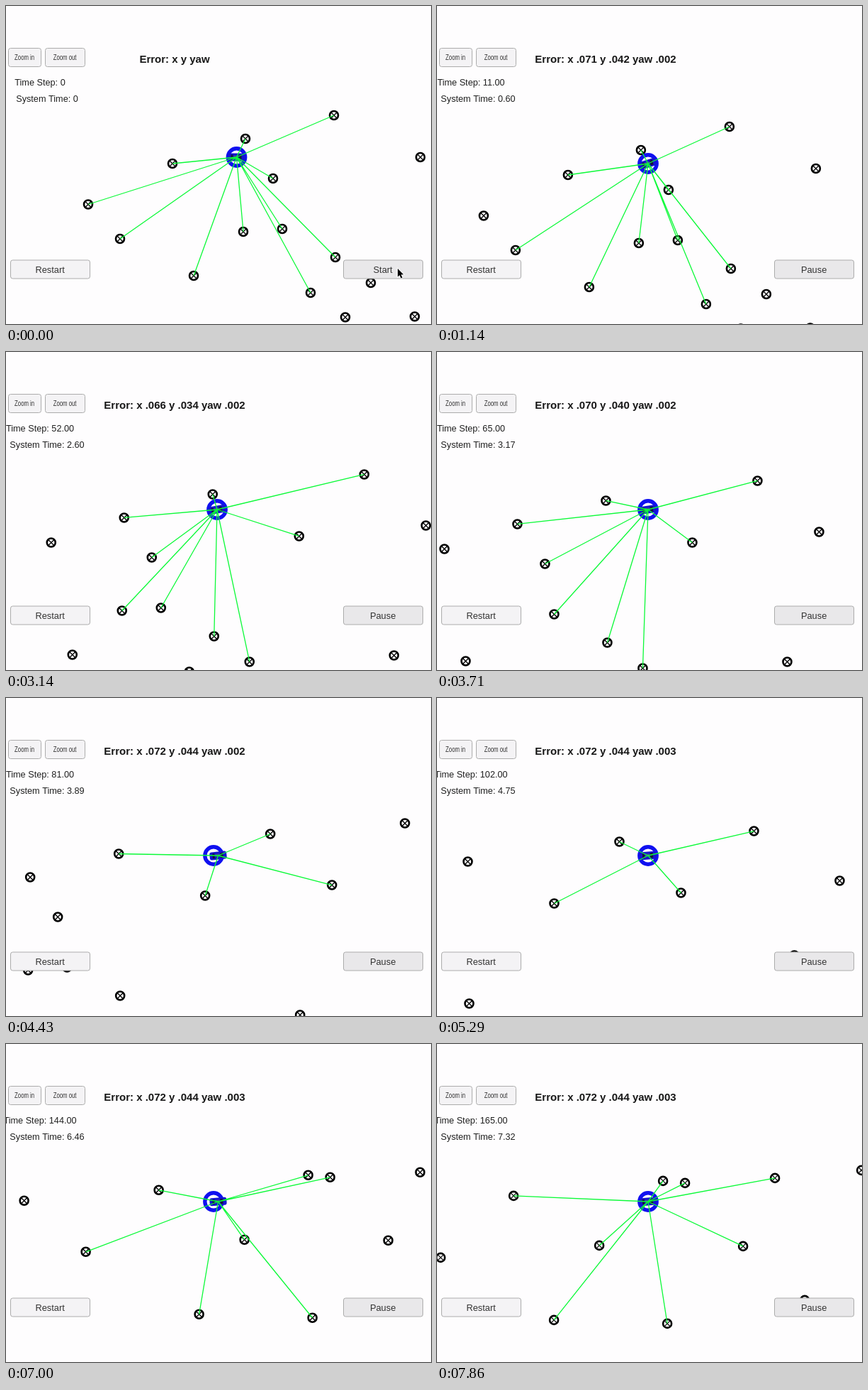
Animation of 600 by 448 pixels, one loop 8000 ms. Source, as an HTML page with a canvas:

```html
<!DOCTYPE html>
<html lang="en">
<head>
<meta charset="utf-8">
<title>Vehicle localization</title>
<style>
html, body { margin: 0; width: 100%; height: 100%; overflow: hidden; background: #fefdfe; }
canvas { display: block; }
</style>
</head>
<body>
<canvas id="c" width="600" height="448"></canvas>
<script>
const ctx = document.getElementById('c').getContext('2d');
const LOOP = 8000, FRAMES = 56, STEP = LOOP / FRAMES, START = 4;
const CLOCK_START = 0.54, RANGE = 229.5;
const PAPER = '#fefdfe', BLUE = '#1010f0';
const FONT = '"Liberation Sans", Arial, sans-serif';

// the map, in stage coordinates before any scrolling
const landmarks = [
  [463, 154], [338, 187], [235, 222], [116, 279.5], [161, 328], [265, 380],
  [335, 318], [377, 243], [390, 314], [465, 354], [430, 404], [515, 390],
  [479, 438.5], [577, 437.5], [585, 213], [677, 126], [764, 198], [719, 381],
  [867, 111], [988, 181], [1078, 90], [1109, 93], [924, 286], [1084, 291],
  [1236, 86], [1191, 182], [1358, 75], [1278, 258]
];

// clock in seconds, distance scrolled
const path = [[0, 28.5], [0.6, 50], [1.745, 111], [2.6, 171], [3.89, 304], [5.6, 541], [7.318, 759]];

function slope(i) {
  const [t0, x0] = path[Math.max(0, i)], [t1, x1] = path[Math.min(path.length - 1, i + 1)];
  return t1 > t0 ? (x1 - x0) / (t1 - t0) : 0;
}

function tangent(i) {
  if (i === 0) return slope(0);
  if (i === path.length - 1) return slope(i - 1);
  const before = path[i][0] - path[i - 1][0], after = path[i + 1][0] - path[i][0];
  return (slope(i - 1) * after + slope(i) * before) / (before + after);
}

// cubic Hermite curve through the path
function scrollX(t) {
  let i = 0;
  while (i < path.length - 2 && t >= path[i + 1][0]) i++;
  const [t0, x0] = path[i], [t1, x1] = path[i + 1];
  const h = t1 - t0, u = (t - t0) / h, v = 1 - u;
  return v * v * (1 + 2 * u) * x0 + u * u * (3 - 2 * u) * x1
    + h * u * v * (v * tangent(i) - u * tangent(i + 1));
}

// the road bends from a climb into an almost level stretch
const scrollY = x => 0.075 * x + 46 * Math.tanh(x / 184);

const stepCount = (t, x) => Math.max(1, Math.round(17.4 * t + 0.052 * x - 2));
const decimal = v => '.' + String(Math.round(v)).padStart(3, '0');

function errorText(t) {
  const dip = Math.exp(-((t - 2.05) ** 2));
  return `Error: x ${decimal(72.4 - 9.3 * dip)} y ${decimal(44 - 14 * dip)} yaw ${decimal(t > 4.7 ? 3 : 2)}`;
}

function text(str, x, y, size, color = '#202020', weight = '') {
  ctx.font = `${weight} ${size}px ${FONT}`;
  ctx.fillStyle = color;
  ctx.textAlign = 'center';
  ctx.fillText(str, x, y);
}

function button(label, x, y, w, h, fill = '#f4f3f5', size = 12.8, squeeze = 1) {
  ctx.beginPath();
  ctx.roundRect(x + 0.5, y + 0.5, w - 1, h - 1, 3);
  ctx.fillStyle = fill;
  ctx.fill();
  ctx.strokeStyle = '#acacac';
  ctx.lineWidth = 1;
  ctx.stroke();
  ctx.save();
  ctx.translate(x + w / 2 - 0.4, y + h / 2 + size * 0.36);
  ctx.scale(squeeze, 1);
  text(label, 0, 0, size, '#333');
  ctx.restore();
}

function marker(x, y) {
  ctx.strokeStyle = '#000';
  ctx.lineWidth = 2.6;
  ctx.beginPath();
  ctx.arc(x, y, 6, 0, 7);
  ctx.stroke();
  ctx.lineWidth = 1.3;
  ctx.beginPath();
  for (const side of [-4, 4]) {
    ctx.moveTo(x - side, y - 4);
    ctx.lineTo(x + side, y + 4);
  }
  ctx.stroke();
}

function vehicle(x, y, lag, heading) {
  ctx.beginPath();
  ctx.arc(x - lag, y, 12.2, 0, 7);
  ctx.fillStyle = PAPER;
  ctx.fill();
  ctx.lineWidth = 5.4;
  ctx.strokeStyle = BLUE;
  ctx.stroke();

  ctx.save();
  ctx.translate(x + lag * 0.3, y);
  ctx.rotate(heading);
  ctx.fillStyle = '#1414d0';
  ctx.beginPath();
  ctx.roundRect(-12, -5.5, 24, 11, 3);
  ctx.fill();
  ctx.fillStyle = '#15153c';
  ctx.fillRect(-8, -3.5, 3, 7);
  ctx.fillRect(3, -3.5, 4, 7);
  ctx.fillStyle = '#4444a0';
  ctx.fillRect(-4, -2.5, 6, 4);
  ctx.restore();
}

function beams(points, x, y) {
  ctx.strokeStyle = '#0cfa38';
  ctx.lineWidth = 1.3;
  ctx.beginPath();
  for (const [px, py] of points) {
    ctx.moveTo(x, y);
    ctx.lineTo(px, py);
  }
  ctx.stroke();
}

function cursor(x, y) {
  ctx.save();
  ctx.translate(x, y);
  const arrow = new Path2D('M0 0V11.5L2.6 9.2L4.6 13.6L6.6 12.7L4.7 8.4L8.2 8.2Z');
  ctx.lineWidth = 1.5;
  ctx.strokeStyle = '#fff';
  ctx.stroke(arrow);
  ctx.fillStyle = '#000';
  ctx.fill(arrow);
  ctx.restore();
}

function draw(k) {
  const running = k >= START;
  const t = k * STEP / 1000 - CLOCK_START;
  let sx = 0, sy = 0, x = 325.5, y = 213, lag = 0, heading = 0;
  if (running) {
    sx = scrollX(t);
    sy = scrollY(sx);
    x = 298;
    y = 222;
    const dx = sx - scrollX(t - 0.05);
    heading = -Math.atan2(sy - scrollY(sx - dx), dx);
    // the estimate trails the car on about half of the updates
    if ((k * 5 + 10) % 11 < 6) lag = Math.min(5, dx);
  }

  ctx.fillStyle = PAPER;
  ctx.fillRect(0, 0, 600, 448);

  const points = landmarks.map(([px, py]) => [px - sx, py + sy]);
  for (const [px, py] of points) marker(px, py);
  vehicle(x, y, lag, heading);
  beams(points.filter(([px, py]) => Math.hypot(px - x, py - y) < RANGE), x + lag * 0.3, y);

  button('Zoom in', 3, 59, 47, 27, undefined, 10.5, 0.74);
  button('Zoom out', 55, 59, 57, 27, undefined, 10.5, 0.74);
  button('Restart', 6, 357.5, 113, 27);
  button(running ? 'Pause' : 'Start', 476, 357.5, 113, 27, '#e9e8ea');

  text(running ? errorText(t) : 'Error: x y yaw', 238, 79.6, 15, '#181818', 'bold');
  text('Time Step: ' + (running ? stepCount(t, sx).toFixed(2) : 0), 48, 112, 12.7);
  text('System Time: ' + (running ? t.toFixed(2) : 0), 58, 135, 12.7);

  if (!running) cursor(553, 370);
}

const origin = performance.now();
function frame() {
  const t = (performance.now() - origin) % LOOP;
  draw(Math.min(FRAMES - 1, Math.floor((t + 4) / STEP)));
  requestAnimationFrame(frame);
}
frame();
</script>
</body>
</html>
```
